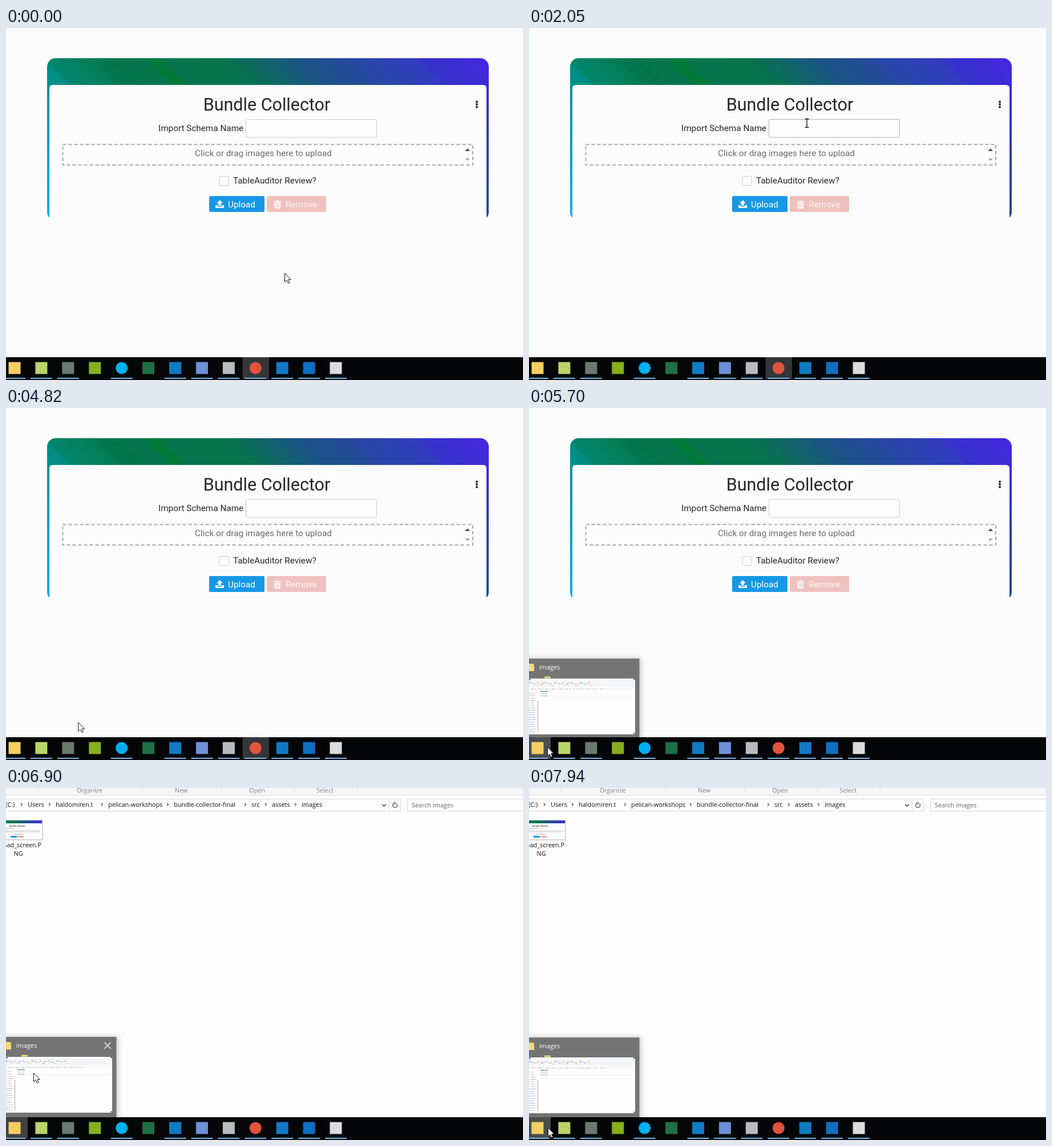
Animation, 906 px wide and 618 px high, one loop 8000 ms. Source, as an HTML page:

```html
<!DOCTYPE html>
<html lang="en">
<head>
<meta charset="utf-8">
<title>Upload screen</title>
<style>
html, body { margin: 0; width: 100%; height: 100%; overflow: hidden; background: #fcfcfc; }
svg { display: block; }
text { font-family: Roboto, sans-serif; font-size: 15.3px; fill: #252529; white-space: pre; }
.mid { text-anchor: middle; }
.ui text { font: 10.9px "Open Sans", "Noto Sans", sans-serif; fill: #111; }
.ui .dim { fill: #808388; }
</style>
</head>
<body>
<svg width="906" height="618" viewBox="0 0 906 618">
  <defs>
    <linearGradient id="band" gradientUnits="userSpaceOnUse" x1="-211" y1="53" x2="317.5" y2="-475.5">
      <stop stop-color="#00acfa"/>
      <stop offset=".24" stop-color="#009088"/>
      <stop offset=".38" stop-color="#06764e"/>
      <stop offset=".56" stop-color="#06744d"/>
      <stop offset=".68" stop-color="#1b5485"/>
      <stop offset=".84" stop-color="#2c40b2"/>
      <stop offset="1" stop-color="#4524e4"/>
    </linearGradient>
    <linearGradient id="mini"><stop stop-color="#058470"/><stop offset=".4" stop-color="#06754c"/><stop offset="1" stop-color="#4028dc"/></linearGradient>
    <clipPath id="card"><rect x="72" y="53" width="774" height="285" rx="15"/></clipPath>
  </defs>

  <rect width="906" height="618" fill="#fcfcfc"/>
  <g id="page">
    <g clip-path="url(#card)">
      <rect x="72" y="53" width="774" height="285" fill="url(#band)"/>
      <g id="stripes"></g>
    </g>
    <path d="M76 340V106Q76 100 82 100H836Q842 100 842 106V340Z" fill="#fcfcfc"/>
    <text class="mid" x="457" y="144.500" style="font-size:30.5px">Bundle Collector</text>
    <path d="M825 129.500V139" stroke="#222" stroke-width="4" stroke-linecap="round" stroke-dasharray="0 4.600"/>
    <text x="267" y="181">Import Schema Name</text>
    <rect id="field" x="420.500" y="160.500" width="229" height="31.500" rx="2" fill="#fdfdfd"/>
    <rect x="99.500" y="204.500" width="718.500" height="36" fill="none" stroke="#a8a8a8" stroke-width="2" stroke-dasharray="6 4"/>
    <text class="mid" x="451" y="225" style="fill:#6b6b6b">Click or drag images here to upload</text>
    <path d="M804.500 216L808.800 211.500L813 216Z" fill="#444"/>
    <path d="M804.500 229L808.800 233.500L813 229Z" fill="#aaa"/>
    <rect x="374" y="260.500" width="16" height="16" rx="1.500" fill="#fdfdfd" stroke="#ccc"/>
    <text x="398" y="273">TableAuditor Review?</text>
    <rect id="upload" x="356" y="295" width="97" height="28" rx="2.500"/>
    <path d="M374.500 302L380 307.500H376.700V312H372.300V307.500H369ZM367 311H371V313.500H378V311H382V316H367Z" fill="#fff"/>
    <text x="389" y="314.500" style="fill:#fff">Upload</text>
    <rect x="457" y="295" width="104" height="28" rx="2.500" fill="#efc1bf"/>
    <path d="M469.500 304H473.500L474.500 302.500H477.500L478.500 304H482V306H469.500ZM470.500 307H481V315Q481 317 479 317H472.500Q470.500 317 470.500 315Z" fill="#fdf6f5"/>
    <path d="M473.500 309V315M475.800 309V315M478 309V315" stroke="#efc1bf"/>
    <text x="490" y="314.500" style="fill:#fdf6f5">Remove</text>
  </g>

  <g id="window" class="ui">
    <rect width="906" height="578" fill="#fdfdfd"/>
    <rect width="906" height="12" fill="#f5f6f7"/>
    <path d="M0 12.500H906" stroke="#dedfe0"/>
    <path d="M-1 19.500H691.500V40.500H-1M671.500 19.500V40.500M910 19.500H703.500V40.500H910" fill="none" stroke="#d9d9d9"/>
    <path d="M659 28.500L662.500 32L666 28.500" fill="none" stroke="#555" stroke-width="1.700"/>
    <path d="M684.500 27.500A4 4 0 1 1 680 26.500M680 24L682.500 26.500L680 29" fill="none" stroke="#555" stroke-width="1.300"/>
    <text x="711" y="33.500" style="fill:#666">Search images</text>
    <g id="labels"></g>
    <rect x="-20" y="56" width="85" height="36" fill="#d5d5d5"/>
    <rect x="-20" y="57" width="83" height="33" fill="#fdfdfd"/>
    <rect x="-20" y="57" width="83" height="5" fill="url(#mini)"/>
    <text class="mid" x="20" y="67.500" style="font-size:3.4px;font-weight:700;fill:#444">Bundle Collector</text>
    <path d="M0 71H15" stroke="#aaa"/>
    <path d="M0 76H60" stroke="#e4e4e4" stroke-width="4"/>
    <path d="M12 81H29" stroke="#aaa"/>
    <path d="M8 85.500H19" stroke="#1798e5" stroke-width="3"/>
    <path d="M20 85.500H31" stroke="#efaaa8" stroke-width="3"/>
    <text x="62" y="104" text-anchor="end">upload_screen.P</text>
    <text class="mid" x="21.500" y="118.500">NG</text>
  </g>

  <g id="preview" class="ui">
    <rect x="-20" y="437" width="213.500" height="150" fill="#747474" style="filter:drop-shadow(3px -1px 4px #0003)"/>
    <path d="M0 446H7L9 448V459H0Z" fill="#f5d978"/>
    <text x="18" y="456" style="fill:#fff">images</text>
    <path id="close" d="M172.500 446.500L183.500 457.500M183.500 446.500L172.500 457.500" stroke="#fff" stroke-width="1.200"/>
    <rect y="472" width="186" height="98" fill="#fdfdfd"/>
    <rect y="475" width="186" height="12" fill="#f5f6f8"/>
    <path d="M0 473.500H3M183 473H186M183 568.500H186" stroke="#2a72b8" stroke-width="2"/>
    <path d="M27 470H38" stroke="#e6dc78" stroke-width="3"/>
    <path d="M0 490H182M17 503H186" stroke="#f0f0f0"/>
    <path d="M4 490.500H137" stroke="#aaa" stroke-dasharray="5 2 2 3" stroke-width=".8"/>
    <path d="M15.500 512V566" stroke="#ccc" stroke-width="2"/>
    <path d="M20 494.500H33" stroke="#3a6f8d"/>
    <path d="M20 498.500H33" stroke="#e2e6e8" stroke-width="3"/>
    <path d="M21 502.500H32" stroke="#999" stroke-dasharray="3 1"/>
    <g id="marks"></g>
  </g>

  <rect y="578" width="906" height="40" fill="#030507"/>
  <rect id="folderTile" y="578" width="38" height="38"/>
  <rect id="pageTile" x="414.500" y="578" width="46.500" height="38" fill="#343638"/>
  <g id="apps"></g>

  <g id="cursor">
    <path d="M.5 .5V16L4 12.700L6.500 18L9 17L6.700 11.700H11.300Z" fill="#fff" stroke="#111"/>
    <path d="M-1 10V1.500Q0 -.5 1.500 1.500V7L10 8.500Q11.500 9 11 12L9.500 18H1L-5 11.500Q-4 9 -1 11Z" fill="#fff" stroke="#111"/>
    <path d="M-3.500 -7.500H-1L0 -6.500L1 -7.500H3.500M0 -6.500V6.500M-3.500 7.500H-1L0 6.500L1 7.500H3.500" fill="none" stroke="#111" stroke-width="1.300"/>
  </g>
</svg>
<script>
const $ = id => document.getElementById(id);
const fill = (id, list, part) => $(id).innerHTML += list.map(part).join('');
const bar = (x, y, w, h, c, r = 0) =>
  `<rect x="${x}" y="${y}" width="${w}" height="${h}" rx="${r}" fill="${c}"/>`;
const LOOP = 8000;

// Slanted header stripes: start, width, tint
fill('stripes', [[66, 86, '#00783c40'], [152, 38, '#00703c55'], [242, 28, '#007a38'], [601, 120, '#3a40d01c'], [721, 77, '#3a28d850']],
  ([x, w, c]) => `<path d="M${x} 53h${w}l50 50h${-w}z" fill="${c}"/>`);

// Address bar: every folder follows a chevron
fill('labels', [[-1, '(C:)'], [38, 'Users'], [87, 'haldomiren.t'], [179, 'pelican-workshops'],
  [294, 'bundle-collector-final'], [430, 'src'], [466, 'assets'], [518, 'images']], ([x, name]) =>
  `<text x="${x}" y="33">${name}</text>
   <path d="M${x - 12} 26.500l2.500 2.500l-2.500 2.500" fill="none" stroke="#555" stroke-width="1.200"/>`);

// Ribbon groups sit centred between their dividers
const dividers = [56.5, 239.5, 377.5, 505.5, 615.5];
fill('labels', dividers, x => bar(x - .5, 0, 1, 9, '#dedfe0'));
fill('labels', ['Organize', 'New', 'Open', 'Select'], (name, i) =>
  `<text class="mid dim" x="${(dividers[i] + dividers[i + 1]) / 2 - 1.5}" y="7.500">${name}</text>`);

// Tiny ribbon icons and sidebar rows of the window preview
const count = n => [...Array(n).keys()];
fill('marks', count(15), i =>
  bar(i * 7.4, 478 + i % 2 * 2, 2.5, 3, ['#a9c5de', '#ccd3d9', '#e3d398'][i % 3]) +
  bar(i * 7.4 + 3, 479 + i % 3 * 2, 4, .8, '#bbb'));
fill('marks', count(17), i =>
  bar(1, 497 + i * 4.2, 1.5, 1.8, i < 7 ? '#eedb9c' : '#8dbbe0') +
  bar(3.5, 497.5 + i * 4.2, 6 + i * 5 % 4, .8, '#aaa'));

// Taskbar
const round = [4, 9], idle = [3, 5];
fill('apps', ['#f6cf62', '#b9d56a', '#6b7a6e', '#86b01e', '#00aff0', '#1e7145', '#0f7bc4',
  '#6f8fd8', '#b8bcc0', '#e0533d', '#1279c4', '#0f6fc0', '#dcdcdc'], (c, i) => {
  const x = 15 + i * 46.92;
  return bar(x - 10.5, 586.5, 21, 21, c, round.includes(i) ? 10.5 : 0) +
    (idle.includes(i) ? '' : bar(x - 19, 614, 38, 2, '#76b9ed'));
});

// Pointer moves: from time, to time, x, y; it rests in between
const moves = [
  [0, 0, 488, 430], [700, 900, 459, 427], [900, 1550, 424, 212], [1600, 2050, 487, 167],
  [3020, 3420, 436, 242], [3420, 3710, 488, 397], [3710, 3870, 509, 420], [3930, 4230, 498, 495],
  [4540, 4700, 264, 541], [4700, 4820, 126.5, 551.5], [4820, 5260, 22, 594], [5400, 5420, 32, 595],
  [5880, 6000, 48, 500], [7380, 7520, 73, 545], [7520, 7640, 33, 596]
];
const ramp = (t, a, b) => t >= b ? 1 : Math.max(0, (t - a) / (b - a));
const pointer = t => moves.reduce(([px, py], [a, b, x, y]) => {
  const p = ramp(t, a, b);
  return [px + (x - px) * p, py + (y - py) * p];
}, [0, 0]);
const show = (el, on) => el.style.display = on ? '' : 'none';

function draw(t) {
  const [x, y] = pointer(t);
  const over = (l, top, r, bottom) => x >= l && x <= r && y >= top && y <= bottom;
  const onPage = t < 5640;
  const onField = onPage && over(420, 160, 650, 192);
  const onUpload = onPage && over(356, 295, 453, 323);
  const onDrop = onPage && over(99, 204, 818, 241);
  const shape = onField ? 2 : onUpload || onDrop ? 1 : 0;
  $('cursor').setAttribute('transform', `translate(${x} ${y})`);
  [...$('cursor').children].forEach((c, i) => show(c, i === shape));

  $('field').setAttribute('stroke', onField ? '#b0b0b0' : '#ccc');
  $('upload').setAttribute('fill', onUpload ? '#1080c4' : '#1798e5');
  $('window').style.opacity = t < 6140 ? 0 : .5 + ramp(t, 6140, 6220) / 2;

  // The preview rises in on hover and fades after the click
  const again = t >= 7780, rest = again ? 7967 : 5780;
  $('preview').style.opacity = onPage ? 0 : again ? ramp(t, 7740, 7860) : ramp(t, 5600, 5700) - ramp(t, 6980, 7110);
  $('preview').setAttribute('transform', `translate(0 ${Math.max(0, (rest - t) * 3 / 80)})`);
  show($('close'), over(0, 437, 193, 578));

  const onFolder = over(0, 578, 38, 618);
  $('folderTile').setAttribute('fill', onFolder ? '#4b4d4f' : onPage ? 'none' : '#3f4143');
  show($('pageTile'), onPage);
}

const start = performance.now();
function tick() {
  draw((performance.now() - start) % LOOP);
  requestAnimationFrame(tick);
}
tick();
</script>
</body>
</html>
```
